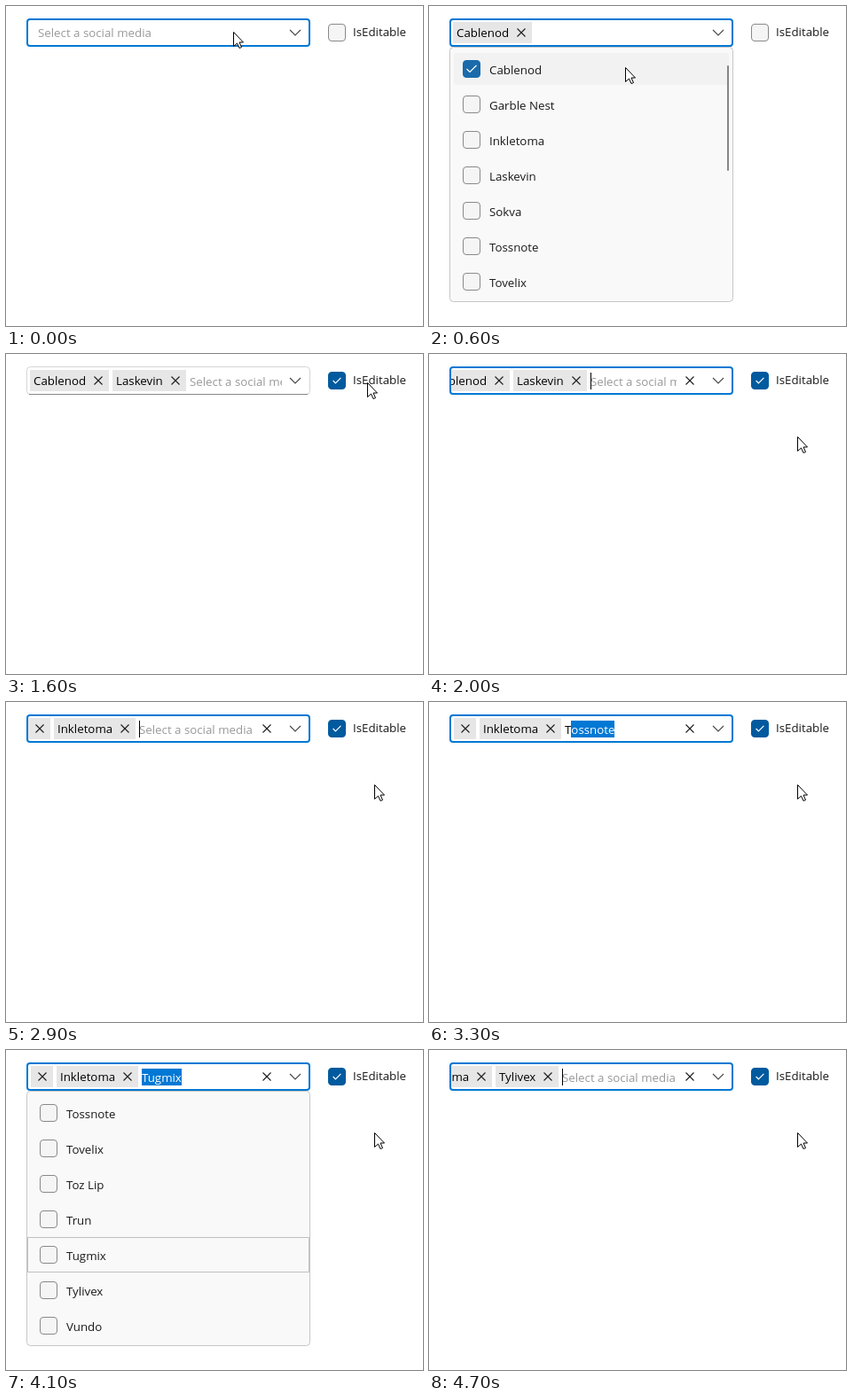
An HTML page with a canvas for the animation above (5100 ms loop, 470 by 361 pixels).

```html
<!DOCTYPE html>
<html lang="en">
<head>
<meta charset="utf-8">
<title>Multi-select combo box</title>
<style>
html, body { margin: 0; width: 470px; height: 361px; overflow: hidden; background: #fff; }
canvas { display: block; }
</style>
</head>
<body>
<canvas id="stage" width="470" height="361"></canvas>
<script>
const LOOP = 5100, STEP = 100;
const ctx = document.getElementById('stage').getContext('2d');
const BLUE = '#0078d4', NAVY = '#005a9e', INK = '#1a1a1a', HINT = '#999';
const HINT_TEXT = 'Select a social media';

const items = ['Cablenod', 'Garble Nest', 'Inkletoma', 'Laskevin', 'Sokva', 'Tossnote',
  'Tovelix', 'Toz Lip', 'Trun', 'Tugmix', 'Tylinex', 'Vundo'];
items[10] = 'Tylivex';

// [time, x, y]
const mousePath = [[0, 256, 29], [400, 256, 29], [600, 221, 69], [800, 215, 190], [1000, 215, 190],
  [1300, 407, 32], [1600, 407, 32], [1900, 415, 93]];
// [time, item, typed letters]; item -1 shows the hint
const edits = [[0, -1, 0], [2400, 2, 1], [2600, 2, 2], [2900, -1, 0], [3300, 5, 1], [3700, 6, 0],
  [3800, 7, 0], [4000, 8, 0], [4100, 9, 0], [4300, 10, 0], [4700, -1, 0]];
// [time, item] for each added chip
const picks = [[600, 0], [1000, 3], [2900, 2], [4700, 10]];

const within = (t, from, to) => t >= from && t < to;

function mouseAt(t) {
  const i = mousePath.findIndex(p => p[0] > t);
  if (i < 0) return mousePath.at(-1).slice(1);
  const [t0, x0, y0] = mousePath[i - 1], [t1, x1, y1] = mousePath[i];
  const k = (t - t0) / (t1 - t0);
  return [Math.round(x0 + (x1 - x0) * k), Math.round(y0 + (y1 - y0) * k)];
}

function text(s, x, y, color = INK) {
  ctx.fillStyle = color;
  ctx.fillText(s, x, y);
}

function fill(x, y, w, h, color) {
  ctx.fillStyle = color;
  ctx.fillRect(x, y, w, h);
}

function box(x, y, w, h, r, color, border, weight = 1) {
  const d = weight / 2;
  ctx.beginPath();
  ctx.roundRect(x + d, y + d, w - weight, h - weight, r);
  ctx.fillStyle = color;
  ctx.fill();
  ctx.lineWidth = weight;
  ctx.strokeStyle = border;
  ctx.stroke();
}

function line(points, color, weight) {
  ctx.beginPath();
  points.forEach(p => ctx.lineTo(...p));
  ctx.lineWidth = weight;
  ctx.strokeStyle = color;
  ctx.stroke();
}

function cross(x, y) {
  for (const s of [-1, 1]) line([[x - 4.5, y - 4.5 * s], [x + 4.5, y + 4.5 * s]], INK, 1.1);
}

function clipTo(x, y, w, h, draw) {
  ctx.save();
  ctx.beginPath();
  ctx.rect(x, y, w, h);
  ctx.clip();
  draw();
  ctx.restore();
}

function checkBox(x, y, on, size = 1, color = NAVY) {
  box(x, y, 20, 20, 3.5, on ? color : '#f5f5f5', on ? color : '#898989');
  if (!on) return;
  const cx = x + 10, cy = y + 10;
  line([[cx - 5.5 * size, cy], [cx - 2 * size, cy + 3.5 * size], [cx + 5.5 * size, cy - 4 * size]], '#fff', 1.2);
}

function chips(names, left) {
  for (const name of names) {
    const w = chipWidth(name);
    fill(left, 18, w, 24, '#e6e6e6');
    text(name, left + 4, 35, '#000');
    cross(left + w - 12, 30);
    left += w + 4;
  }
}

const chipWidth = name => Math.round(ctx.measureText(name).width) + 30;

function editor(x, item, typed) {
  if (item < 0) {
    text(HINT_TEXT, x, 36, HINT);
    return fill(x, 21, 1, 19, '#000');
  }
  const word = items[item], head = word.slice(0, typed), tail = word.slice(typed);
  const mid = x + ctx.measureText(head).width;
  text(head, x, 36, '#000');
  fill(Math.round(mid), 21, Math.round(ctx.measureText(tail).width), 19, BLUE);
  text(tail, mid, 36, '#fff');
}

function field(t) {
  const focused = !within(t, 1500, 2000);
  const names = picks.filter(p => t >= p[0]).map(p => items[p[1]]);
  const total = names.reduce((sum, n) => sum + chipWidth(n) + 4, 0);
  if (focused) box(23, 14, 320, 32, 3, '#fff', BLUE, 2);
  else {
    box(23, 14, 320, 32, 4, '#fff', '#d4d4d4');
    fill(26, 45, 314, 1, '#868686');
  }
  line([[320, 27], [326, 33], [332, 27]], '#444', 1.1);

  if (!names.length) return text(HINT_TEXT, 36, 35, HINT);
  if (t < 2000) {
    chips(names, 27);
    if (t >= 1600) clipTo(25, 16, 286, 28, () => text(HINT_TEXT, 27 + total, 36, HINT));
    return;
  }
  const [, item, typed] = edits.findLast(e => t >= e[0]);
  const shifted = within(t, 3300, 4700);
  const textX = t < 2900 ? 182 : shifted ? 153 : 150;
  const clipX = shifted ? 28 : 25;
  clipTo(clipX, 16, 279 - clipX, 28, () => {
    chips(names, textX - total);
    editor(textX, item, typed);
  });
  cross(294, 30);
}

function popup(t, mouseY) {
  const late = t >= 3500;
  const active = late ? Math.max(5, edits.findLast(e => t >= e[0])[1]) : -1;
  box(23, 46, 320, 288, 4, '#f9f9f9', '#c6c6c6');
  if (!late) fill(25, 44, 316, 2, BLUE);
  const first = late ? 5 : 0;
  for (let row = 0; row < 7; row++) {
    const i = first + row, y = 51 + row * 40;
    const on = picks.some(p => p[1] === i && t >= p[0]);
    const hover = !late && t < 1200 && mouseY >= y && mouseY < y + 40;
    if (on || hover) {
      ctx.beginPath();
      ctx.roundRect(28, y + 2, 310, 36, 3);
      ctx.fillStyle = hover ? '#f2f2f2' : '#efefef';
      ctx.fill();
    }
    if (i === active) box(24, y, 318, 40, 0, '#f9f9f9', '#c0c0c0');
    checkBox(38, y + 10, on, 1, hover ? '#1a6bab' : NAVY);
    text(items[i], 68, y + 26);
  }
  if (!late) {
    ctx.beginPath();
    ctx.roundRect(336, 67, 2, 119, 1);
    ctx.fillStyle = '#868686';
    ctx.fill();
  }
}

function pointer(x, y) {
  const shape = [[0, 0], [0, 16], [4, 12.5], [6.5, 18], [9, 17], [6.5, 11.5], [11, 11.5]];
  ctx.beginPath();
  shape.forEach(([dx, dy]) => ctx.lineTo(x + dx + .5, y + dy + .5));
  ctx.closePath();
  ctx.fillStyle = '#fff';
  ctx.fill();
  ctx.lineWidth = 1;
  ctx.strokeStyle = '#000';
  ctx.stroke();
}

function draw(now) {
  const t = Math.floor(now % LOOP / STEP) * STEP;
  const [mx, my] = mouseAt(t);
  ctx.font = '13.3px "Open Sans", "Noto Sans", sans-serif';
  fill(0, 0, 470, 361, '#fff');
  field(t);
  checkBox(363, 20, t >= 1600, .8);
  text('IsEditable', 391, 34);
  if (within(t, 400, 1400) || within(t, 3500, 4700)) popup(t, my);
  pointer(mx, my);
}

const start = performance.now();
(function tick() {
  draw(performance.now() - start);
  requestAnimationFrame(tick);
})();
</script>
</body>
</html>
```
